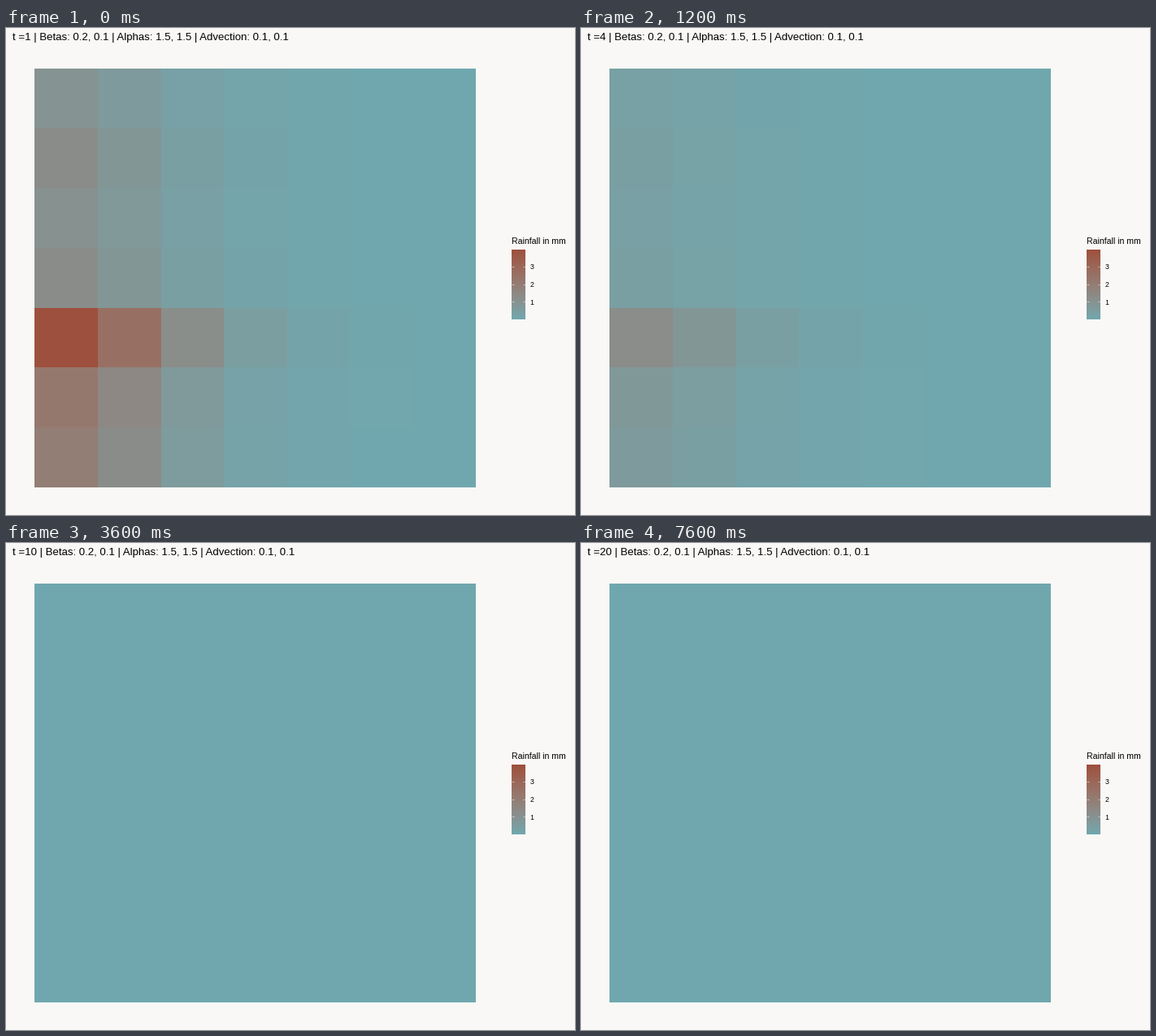
Write a matplotlib script that moves like this. It is 700 by 600 pixels and loops after 8 s.

```python
import numpy as np
import matplotlib.pyplot as plt
from matplotlib.animation import FuncAnimation

WIDTH, HEIGHT, DPI = 700, 600, 100
STEPS, STEP_MS = 20, 400
LOW, HIGH = (112, 167, 174), (157, 80, 61)
PAPER = (249 / 255, 248 / 255, 246 / 255)
MAX_RAIN = 3.96
WHITE_POINT = np.array([0.9505, 1.0, 1.089])
RGB_TO_XYZ = np.array([[0.4124, 0.3576, 0.1805],
                       [0.2126, 0.7152, 0.0722],
                       [0.0193, 0.1192, 0.9505]])


def rgb_to_lab(rgb):
    c = np.asarray(rgb) / 255
    linear = np.where(c > 0.04045, ((c + 0.055) / 1.055) ** 2.4, c / 12.92)
    x, y, z = np.cbrt(RGB_TO_XYZ @ linear / WHITE_POINT)
    return np.array([116 * y - 16, 500 * (x - y), 200 * (y - z)])


def lab_to_rgb(lab):
    y = (lab[..., 0] + 16) / 116
    xyz = np.stack([y + lab[..., 1] / 500, y, y - lab[..., 2] / 200], -1) ** 3
    linear = np.clip(xyz * WHITE_POINT @ np.linalg.inv(RGB_TO_XYZ).T, 0, 1)
    srgb = np.where(linear > 0.0031308,
                    1.055 * linear ** (1 / 2.4) - 0.055, 12.92 * linear)
    return np.clip(srgb, 0, 1)


def rain_color(rain):
    share = np.clip(np.asarray(rain) / MAX_RAIN, 0, 1)[..., None]
    low, high = rgb_to_lab(LOW), rgb_to_lab(HIGH)
    return lab_to_rgb(low + share * (high - low))


# Rainfall separates into a row strength, a decay in x and a decay in time.
row_rain = np.array([0.92, 1.25, 1.05, 1.25, MAX_RAIN, 2.22, 1.92])
first_rain = np.outer(row_rain, np.exp(-0.43 * np.arange(7) ** 1.5))
fade = np.exp(-0.13 * np.arange(STEPS) ** 2)

fig = plt.figure(figsize=(WIDTH / DPI, HEIGHT / DPI), dpi=DPI, facecolor=PAPER)
ax = fig.add_axes([0, 0, 1, 1])
ax.axis("off")


def label(x, baseline, text, size):
    return ax.text(x, baseline, text, fontsize=size * 72 / DPI, color="black",
                   family="Liberation Sans", va="baseline", ha="left")


x_edges = np.ceil(np.linspace(35, 578, 8))
y_edges = np.floor(np.linspace(50, 566, 8) + 0.15)
tiles = ax.pcolormesh(x_edges, y_edges, rain_color(first_rain),
                      antialiased=False, linewidth=0)

# Legend
BAR_LEFT, BAR_RIGHT, BAR_TOP, BAR_BOTTOM = 622, 639, 273, 359
TICK = 3.4
bar_rain = np.linspace(MAX_RAIN, 0, BAR_BOTTOM - BAR_TOP)
ax.pcolormesh([BAR_LEFT, BAR_RIGHT], np.arange(BAR_TOP, BAR_BOTTOM + 1),
              rain_color(bar_rain)[:, None], antialiased=False, linewidth=0)
label(622, 266, "Rainfall in mm", 10.5)
for value in (1, 2, 3):
    y = BAR_BOTTOM - value / MAX_RAIN * (BAR_BOTTOM - BAR_TOP)
    for left in (BAR_LEFT, BAR_RIGHT - TICK):
        ax.plot([left, left + TICK], [y, y], color="white",
                lw=0.5 * 72 / DPI, solid_capstyle="butt")
    label(644.5, y + 3.4, str(value), 8.8)

title = label(8.3, 15, "", 13.27)
ax.set(xlim=(0, WIDTH), ylim=(HEIGHT, 0))


def update(step):
    tiles.set_array(rain_color(first_rain * fade[step]))
    title.set_text(f"t ={step + 1} | Betas: 0.2, 0.1 | Alphas: 1.5, 1.5"
                   " | Advection: 0.1, 0.1")
    return tiles, title


anim = FuncAnimation(fig, update, frames=STEPS, interval=STEP_MS,
                     repeat=True, repeat_delay=0)
plt.show()
```
